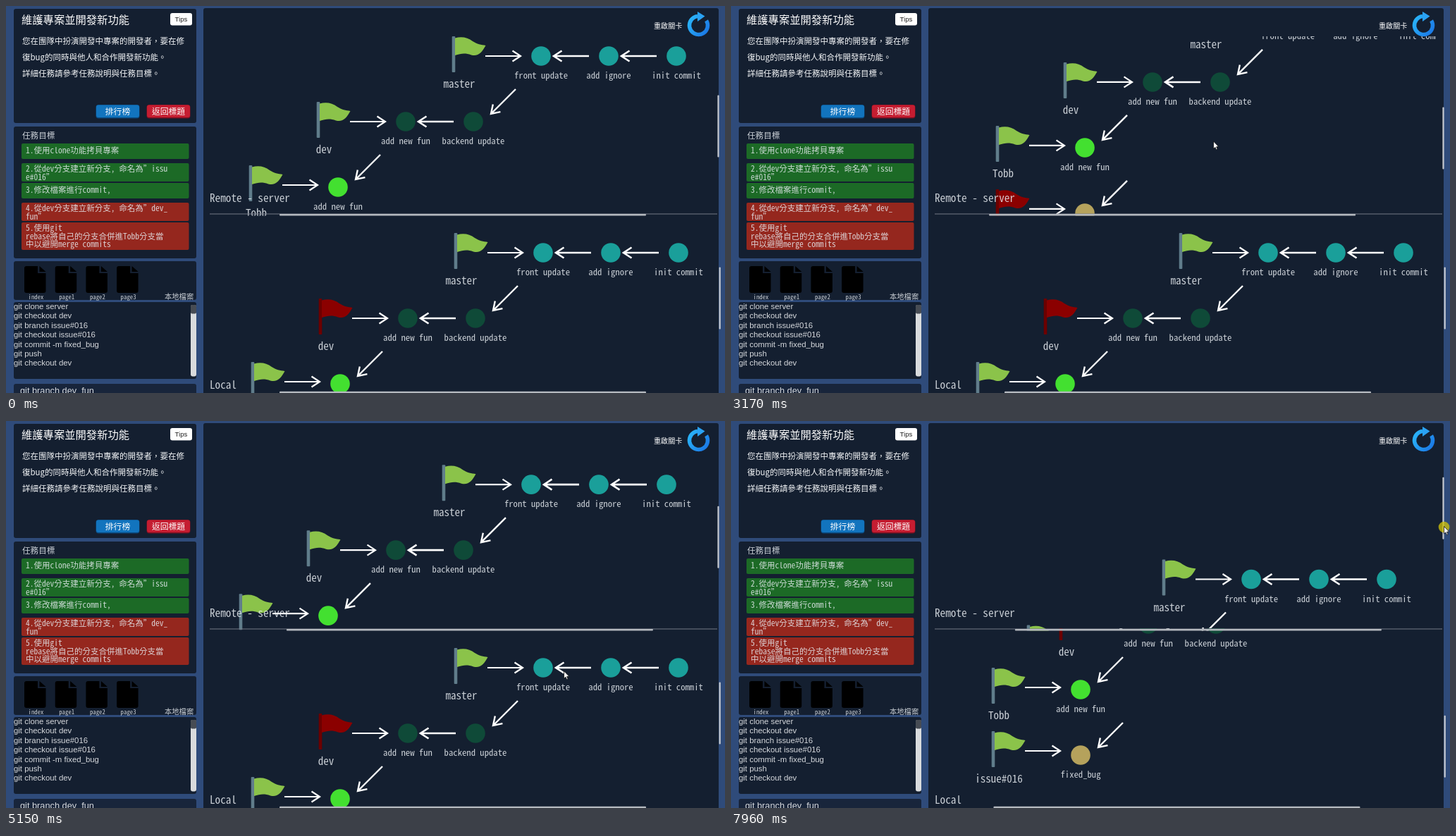
An HTML page with a canvas that plays this animation: 1020 px wide and 549 px high, repeating every 8 s.

```html
<!DOCTYPE html>
<html lang="zh-Hant">
<head>
<meta charset="utf-8">
<title>Git 練習關卡</title>
<style>
html, body { margin: 0; width: 100%; height: 100%; overflow: hidden; background: #2f4b7a; }
canvas { display: block; }
</style>
</head>
<body>
<canvas id="stage" width="1020" height="549"></canvas>
<script>
const ctx = document.getElementById('stage').getContext('2d');
const LOOP = 8000;
const MONO = '"Noto Sans Mono CJK TC", "Noto Sans Mono CJK JP", "Noto Sans Mono", monospace';
const CJK = '"Noto Sans CJK TC", "Noto Sans CJK JP", "Noto Sans CJK", sans-serif';
const ARIAL = '"Liberation Sans", Arial, sans-serif';
const PANEL = '#141f30', PALE = 'rgba(232,236,241,.86)';
const GREEN = '#8bc34a', RED = '#8b0000';
const TEAL = '#1a9f9a', DARK = '#0f4a38', LIME = '#43e030', SAND = '#b5a25c';
const USER = 'Tobb';
const COLUMN = 96, ROW = 93;

// Turning points of each drag: time, x, y
const remoteKeys = [
  [1345, 759, 71], [1530, 771.5, 79], [2030, 771.5, 79], [3170, 790, 15],
  [3880, 716, -56], [4420, 836, -44], [5150, 745, 90], [5930, 743, 209], [7400, 738, 224.5]
];
const localKeys = [
  [5600, 762, 350], [6400, 724, 190], [7010, 826.5, 159], [7350, 763, 190], [7660, 784, 195]
];
const cursorKeys = [
  [30, 954, 522], [370, 801, 238], [510, 801, 238], [1050, 700, 186], [1320, 670.5, 215],
  [1530, 683, 223], [2030, 683, 223], [3170, 684.5, 192], [3700, 645, 180], [4420, 795.5, 192],
  [5550, 787, 416], [6400, 749, 310], [7010, 787, 404], [7750, 1011, 140], [7960, 1011.5, 149.5]
];
const presses = [[1300, 2900], [3700, 4250], [5600, 5850], [6400, 6900], [7800, LOOP]];

// Monotone cubic through the keys
function sample(keys, t, axis) {
  const last = keys.length - 1;
  if (t <= keys[0][0]) return keys[0][axis];
  if (t >= keys[last][0]) return keys[last][axis];
  let i = 0;
  while (keys[i + 1][0] < t) i++;
  const slope = k => k < 0 || k >= last ? 0
    : (keys[k + 1][axis] - keys[k][axis]) / (keys[k + 1][0] - keys[k][0]);
  const tangent = k => {
    const a = slope(k - 1), b = slope(k);
    return a * b > 0 ? 2 * a * b / (a + b) : 0;
  };
  const span = keys[i + 1][0] - keys[i][0], u = (t - keys[i][0]) / span, v = 1 - u;
  return keys[i][axis] * v * v * (1 + 2 * u) + keys[i + 1][axis] * u * u * (3 - 2 * u)
    + span * u * v * (tangent(i) * v - tangent(i + 1) * u);
}
const pointAt = (keys, t) => [sample(keys, t, 1), sample(keys, t, 2)];

function box(x, y, w, h, color, r = 0) {
  ctx.fillStyle = color;
  ctx.beginPath();
  ctx.roundRect(x, y, w, h, r);
  ctx.fill();
}

function disc(x, y, r, color) {
  ctx.fillStyle = color;
  ctx.beginPath();
  ctx.arc(x, y, r, 0, 2 * Math.PI);
  ctx.fill();
}

function shape(path, x, y, color, outline) {
  ctx.save();
  ctx.translate(x, y);
  ctx.fillStyle = color;
  ctx.fill(path);
  if (outline) {
    ctx.strokeStyle = outline;
    ctx.lineWidth = 0.8;
    ctx.stroke(path);
  }
  ctx.restore();
}

// y is the visual middle of the line
function text(str, x, y, size, { font = MONO, color = PALE, align = 'left', weight = 400 } = {}) {
  ctx.font = `${weight} ${size}px ${font}`;
  ctx.textAlign = align;
  ctx.fillStyle = color;
  ctx.fillText(str, x, y + size * 0.36);
}

function arrow(x1, y1, x2, y2, width = 2.2) {
  ctx.save();
  ctx.translate(x2, y2);
  ctx.rotate(Math.atan2(y2 - y1, x2 - x1));
  ctx.strokeStyle = '#fff';
  ctx.lineWidth = width;
  ctx.beginPath();
  ctx.moveTo(-Math.hypot(x2 - x1, y2 - y1), 0);
  ctx.lineTo(0, 0);
  ctx.moveTo(-11.5, -7.5);
  ctx.lineTo(0, 0);
  ctx.lineTo(-11.5, 7.5);
  ctx.stroke();
  ctx.restore();
}

const clothPath = new Path2D('M0 1.5 C8 -1 18 0 25 6 C31 10 37 11 43.5 12 C38 22 33 28 23 25.5 C15 22.5 9 23 0 26 Z');
const filePath = new Path2D('M3 0 H19 V10 H30.5 V35 Q30.5 38 27.5 38 H3 Q0 38 0 35 V3 Q0 0 3 0 Z M21.5 0 L30.5 8 H21.5 Z');
const cursorPath = new Path2D('M0 0 V10.5 L2.4 8.4 L4 12 L5.6 11.2 L4.1 7.8 L7.2 7.6 Z');

function flag(x, y, color, name) {
  box(x - 2.3, y - 28, 4.6, 51, color === RED ? '#6c0000' : '#607d8b', 1);
  shape(clothPath, x + 2, y - 27, color);
  arrow(x + 45, y, x + 95, y);
  text(name, x + 8, y + 39.7, 15, { align: 'center' });
}

// One branch per row; its tip commit sits in the given column
const branches = [
  { name: 'master', column: 0, color: TEAL, commits: ['front update', 'add ignore', 'init commit'] },
  { name: 'dev', column: -2, color: DARK, commits: ['add new fun', 'backend update'] },
  { name: USER, column: -3, color: LIME, commits: ['add new fun'] },
  { name: 'issue#016', column: -3, color: SAND, commits: ['fixed_bug'] }
];

function graph([x, y], current, top, bottom) {
  ctx.save();
  ctx.beginPath();
  ctx.rect(280, top, 720, bottom - top);
  ctx.clip();
  branches.forEach(({ name, column, color, commits }, row) => {
    const tipX = x + column * COLUMN, cy = y + row * ROW;
    flag(tipX - 124, cy - 3 * Math.max(0, row - 1), name === current ? RED : GREEN, name);
    commits.forEach((label, i) => {
      const cx = tipX + i * COLUMN;
      disc(cx, cy, 13.8, color);
      text(label, cx, cy + 27.6, 12.7, { align: 'center' });
      if (i > 0) arrow(cx - 28, cy, cx - 78, cy, 2.6);
      if (row > 0 && i === commits.length - 1) arrow(cx + 60, cy - 46, cx + 25, cy - 11, 2.4);
    });
  });
  ctx.restore();
}

function resetIcon() {
  const shade = ctx.createLinearGradient(968, 18, 998, 38);
  shade.addColorStop(0, '#2ab6fa');
  shade.addColorStop(1, '#1a74e4');
  ctx.strokeStyle = shade;
  ctx.lineWidth = 5.5;
  ctx.beginPath();
  ctx.arc(982.5, 27.5, 13, -0.55, 4.6);
  ctx.stroke();
  shape(new Path2D('M0 0 L10.5 6.5 L0 14 Z'), 981, 8, '#2aa2f4');
}

function button(x, color, edge, label) {
  box(x - 0.5, 140, 62, 19.5, edge, 4);
  box(x, 140.5, 61, 17.5, color, 3);
  text(label, x + 30.5, 149.5, 11.8, { align: 'center', color: '#fff' });
}

const intro = ['您在團隊中扮演開發中專案的開發者，要在修', '復bug的同時與他人和合作開發新功能。', '詳細任務請參考任務說明與任務目標。'];
const tasks = [
  ['1.使用clone功能拷貝專案'],
  ['2.從dev分支建立新分支, 命名為”issu', 'e#016”'],
  ['3.修改檔案進行commit,'],
  ['4.從dev分支建立新分支, 命名為”dev_', 'fun”'],
  ['5.使用git', `rebase將自己的分支合併進${USER}分支當`, '中以避開merge commits']
];
const tasksDone = 3;
const files = ['index', 'page1', 'page2', 'page3'];
const commands = ['git clone server', 'git checkout dev', 'git branch issue#016', 'git checkout issue#016',
  'git commit -m fixed_bug', 'git push', 'git checkout dev'];

function sidebar() {
  for (const [y, h] of [[4, 162], [171, 187], [362, 55], [420, 109]]) box(11, y, 259, h, PANEL, 3);
  box(11, 536, 259, 20, '#18253b', 3);

  text('維護專案並開發新功能', 22, 19, 15.3, { font: CJK, color: '#fff' });
  intro.forEach((line, i) => text(line, 23, 50 + i * 23, 11.5, { font: CJK, color: '#f4f6f8' }));
  box(233, 10, 31, 17.5, '#fff', 3);
  text('Tips', 248.5, 19, 9.6, { font: ARIAL, color: '#222', align: 'center' });
  button(128, '#1274be', '#0a4a80', '排行榜');
  button(200, '#c51d31', '#7c1020', '返回標題');

  text('任務目標', 23, 184, 11.6);
  tasks.forEach((lines, i) => {
    const y = 195 + i * 28, first = lines.length > 1 ? 8.3 : 10.3;
    box(22, y, 237.5, Math.max(22, 13 * lines.length), i < tasksDone ? '#1c6a26' : '#95271e', 2);
    lines.forEach((line, j) => text(line, 28, y + first + j * 11.3, 11.5));
  });

  files.forEach((name, i) => {
    const x = 26 + i * 43.7;
    shape(filePath, x, 369, '#000');
    text(name, x + 16.5, 412.5, 8.8, { align: 'center' });
  });
  text('本地檔案', 225, 412, 10.3);

  commands.forEach((line, i) => text(line, 11, 426 + i * 13.35, 11.4, { font: ARIAL, color: '#d6d9dd' }));
  box(262, 424, 8, 101.5, '#d9dbdd', 3);
  box(262, 424, 8, 12.5, '#474c54', 2);
  text('git branch dev_fun', 20, 545, 12.75, { font: ARIAL, color: '#d6d9dd' });
}

// Both bars move against the content
function scrollbars([x, y], [homeX, homeY], barX, barTop, barY) {
  box(388 - (x - homeX) * 0.708, barY, 520, 2.4, '#b4b8be', 1);
  box(barX, barTop - (y - homeY) * 0.305, 2.2, 88, '#c6cad0', 1);
}

function pointer([x, y], pressed) {
  if (pressed) disc(x, y + 1, 7.8, 'rgba(205,192,10,.78)');
  shape(cursorPath, x, y, '#fff', '#111');
}

function draw(t) {
  box(0, 0, 1020, 549, '#2f4b7a');
  sidebar();
  box(280, 3, 731, 560, PANEL, 3);

  const remote = pointAt(remoteKeys, t), local = pointAt(localKeys, t);
  graph(remote, 'issue#016', 43, 297.5);
  graph(local, 'dev', 294, 549);
  text('Remote - server', 289, 272.5, 15.2);
  text('Local', 289, 538, 15.2);
  box(289, 294.6, 720, 1, '#747b86');
  scrollbars(remote, [759, 71], 1009.4, 126.5, 295);
  scrollbars(local, [762, 350], 1011.6, 370.5, 546.8);

  text('重啟關卡', 919, 28, 10.1, { font: CJK, color: '#fff', weight: 500 });
  resetIcon();
  if (t >= cursorKeys[0][0]) pointer(pointAt(cursorKeys, t), presses.some(([a, b]) => t >= a && t < b));
}

const start = performance.now();
function tick() {
  draw((performance.now() - start) % LOOP);
  requestAnimationFrame(tick);
}
tick();
</script>
</body>
</html>
```
